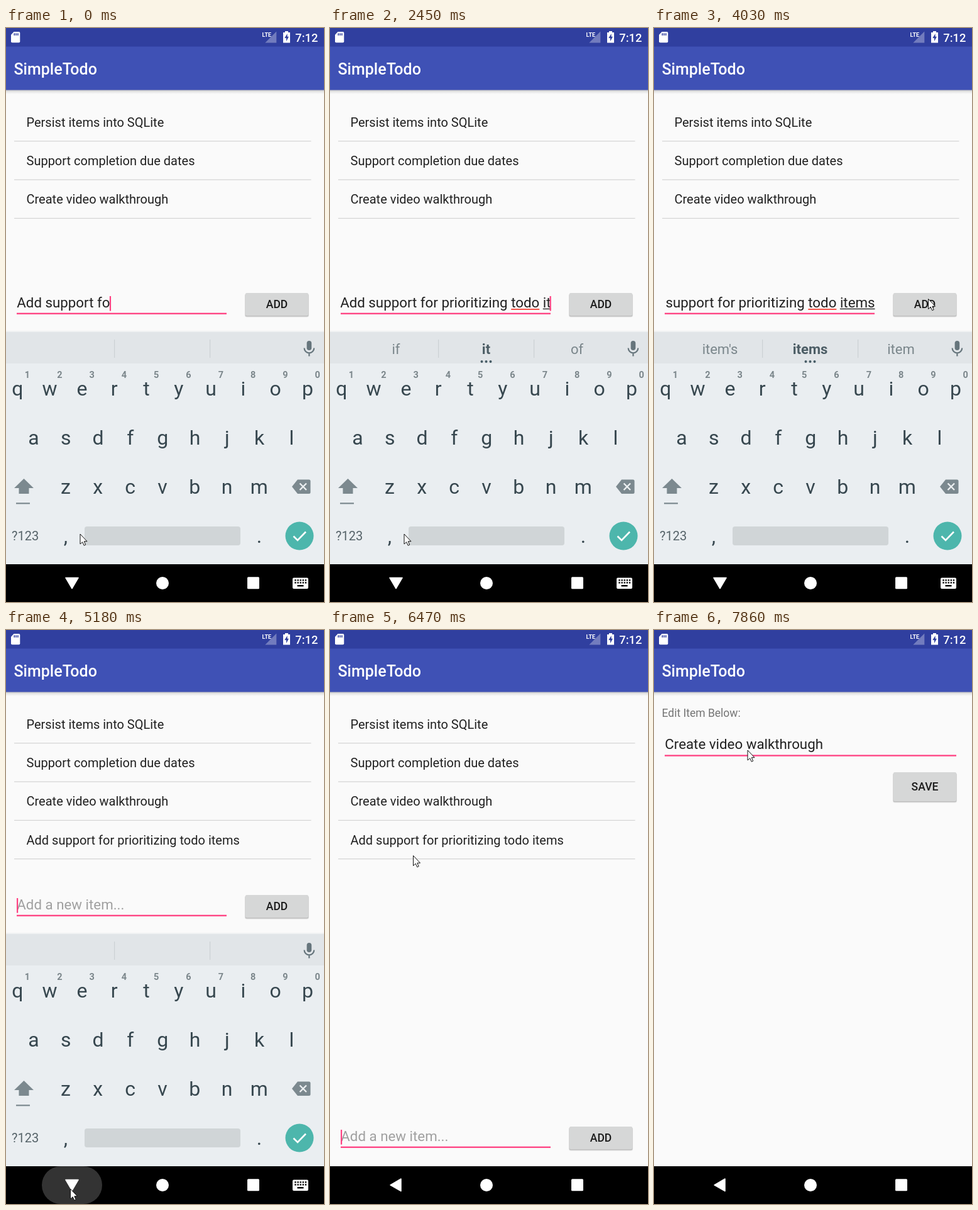
Recreate the animation shown at these times as an HTML page. Size 506 by 912 pixels, loop 7990 ms.

```html
<!DOCTYPE html>
<html lang="en">
<head>
<meta charset="utf-8">
<title>Todo list</title>
<style>
html, body { margin: 0; width: 100%; height: 100%; overflow: hidden; background: #fafafa; }
svg { display: block; width: 100vw; height: 100vh; font-family: Roboto, sans-serif; }
text { white-space: pre; }
.mid { text-anchor: middle; }
.row { font-size: 20px; fill: #212121; }
.field { font-size: 22.3px; fill: #212121; }
.label { font-size: 17.5px; font-weight: 500; fill: #1c1c1c; text-anchor: middle; }
.key { font-size: 32px; fill: #37474f; text-anchor: middle; }
.num { font-size: 14.5px; font-weight: 700; fill: #7b868b; text-anchor: middle; }
.sug { font-size: 22px; fill: #7a868b; text-anchor: middle; }
</style>
</head>
<body>
<svg id="stage" viewBox="0 0 506 912" preserveAspectRatio="none"></svg>
<script>
const LOOP = 7990;
const PINK = '#ff4081';
const $ = id => document.getElementById(id);
const text = (x, y, cls, s, more = '') => `<text x="${x}" y="${y}" class="${cls}" ${more}>${s}</text>`;
const rect = (x, y, w, h, fill, more = '') =>
  `<rect x="${x}" y="${y}" width="${w}" height="${h}" fill="${fill}" ${more}/>`;
const path = (d, fill, more = '') => `<path d="${d}" fill="${fill}" ${more}/>`;

const button = (y, h, label, id) =>
  rect(380, y + 1, 102, h + 1.5, '#000', 'rx="3" opacity=".09"') +
  rect(380.6, y + 1, 100.8, h + .6, '#000', 'rx="2.5" opacity=".16"') +
  rect(381, y, 100, h, '#d6d7d7', `rx="2" id="${id}"`) +
  text(431, y + h / 2 + 6.4, 'label', label);

const header = () =>
  rect(0, 0, 506, 852, '#fafafa') + rect(0, 98, 506, 7, 'url(#shade)') +
  rect(0, 0, 506, 98.5, '#3f51b5') + rect(0, 0, 506, 29.5, '#303f9f') +
  text(12.5, 74, '', 'SimpleTodo', 'font-size="25" font-weight="500" fill="#fff"');

const listRow = (s, i) =>
  text(32.5, 156.8 + i * 61.3, 'row', s) + rect(13, 179.2 + i * 61.3, 472.5, 1.2, '#d4d4d4');

const keyRow = (keys, x, y) => [...keys].map((k, i) => text(x + i * 51.3, y, 'key', k)).join('');

function keyboard() {
  const mic = rect(478.6, 497, 7.6, 15, '#66757c', 'rx="3.8"') +
    path('M474.6 508.5a7.8 7.8 0 0 0 15.6 0M482.4 516.5V521.5', 'none', 'stroke="#66757c" stroke-width="2.2"');
  const shift = path('M28.5 716L44 731H36.500V740H20.500V731H13Z', '#7c898f') + rect(16, 754.2, 22, 2.2, '#7c898f');
  const erase = path('M464 717.500H482a2.500 2.500 0 0 1 2.500 2.500V737.500a2.500 2.500 0 0 1-2.500 2.500H464L455 728.800Z', '#7c898f') +
    path('M467.500 723.500l10.500 10.500m0-10.500l-10.500 10.500', 'none', 'stroke="#eceff1" stroke-width="2.4"');
  const done = '<circle cx="467" cy="807" r="22.500" fill="#4db6ac"/>' +
    path('M457.500 807.500l6.500 6.500L477 800.500', 'none', 'stroke="#fff" stroke-width="2.6"');
  return rect(0, 481, 506, 2, '#f0f2f3') + rect(0, 483, 506, 369, '#e1e5e8') +
    rect(0, 533, 506, 319, '#eaeef1') +
    rect(172, 495, 1.2, 29, '#cbd1d4') + rect(324, 495, 1.2, 29, '#cbd1d4') + mic +
    [105, 248.5, 393].map((x, i) => text(x, 518, 'sug', '', `id="sug${i}"`)).join('') +
    '<g id="dots" fill="#455a64">' +
    [241.5, 248.5, 255.5].map(x => `<circle cx="${x}" cy="530" r="2"/>`).join('') + '</g>' +
    [...'1234567890'].map((n, i) => text(34 + i * 51.3, 556, 'num', n)).join('') +
    keyRow('qwertyuiop', 18.3, 583.5) + keyRow('asdfghjkl', 44, 661.5) + keyRow('zxcvbnm', 95, 740) +
    shift + erase + done + text(9, 814, '', '?123', 'font-size="20" fill="#566369"') +
    rect(125, 792, 248, 30, '#d0d5d7', 'rx="4"') +
    text(95, 818, 'key', ',') + text(403, 818, 'key', '.');
}

function keyboardIcon() {
  let holes = '';
  for (let r = 0; r < 2; r++)
    for (let c = 0; c < 5; c++) holes += rect(459.3 + c * 4.1, 876.2 + r * 4, 2.4, 2.3, '#000');
  return rect(456, 873.5, 25, 17.5, '#fff', 'rx="2"') + holes + rect(463.5, 885, 10, 2.4, '#000');
}

const statusIcons = () =>
  path('M12.500 6H20.500a1.800 1.800 0 0 1 1.800 1.800V21.500a1.800 1.800 0 0 1-1.800 1.800H9.800A1.800 1.800 0 0 1 8 21.500V10.700Z', '#fff') +
  [12.5, 15.3, 18.1].map(x => rect(x, 8.3, 1.6, 3.6, '#303f9f')).join('') +
  path('M430.300 5.500V23.500H412.300Z', '#fff', 'opacity=".32"') +
  text(407.5, 14, '', 'LTE', 'font-size="9" font-weight="700" fill="#fff" textLength-adjust="none"'.replace(' textLength-adjust="none"', '')) +
  path('M444 5H449V7H452V23.500H441V7H444Z', '#fff') +
  path('M447.600 9L443.300 16H446V21L450 13.800H447.600Z', '#303f9f') +
  text(460.3, 21.5, '', '7:12', 'font-size="18.300" font-weight="500" fill="#fff"');

$('stage').innerHTML = `
<defs>
  <linearGradient id="shade" x2="0" y2="1">
    <stop offset="0" stop-opacity=".26"/><stop offset=".4" stop-opacity=".09"/><stop offset="1" stop-opacity="0"/>
  </linearGradient>
  <clipPath id="fieldClip"><rect x="16.500" y="415" width="335.500" height="45"/></clipPath>
</defs>
${header()}
${['Persist items into SQLite', 'Support completion due dates', 'Create video walkthrough'].map(listRow).join('')}
<g id="added">${listRow('Add support for prioritizing todo items', 3)}</g>
${rect(13, 242, 472.5, 60, '#000', 'id="press"')}
<g id="entry">
  ${rect(17, 452.6, 334, 2.3, PINK)}
  <g clip-path="url(#fieldClip)">
    ${text(17.3, 443.6, 'field', '', 'id="typed"')}
    ${rect(0, 446, 0, 1.8, '#f44336', 'id="wrong"')}
    ${rect(0, 445.6, 0, 1.5, '#333', 'id="word"')}
    ${rect(0, 426, 2.2, 23.5, PINK, 'id="caret"')}
  </g>
  ${button(421, 36, 'ADD', 'add')}
</g>
<g id="keys">${keyboard()}</g>
<g id="edit">
  ${header()}
  ${text(12.5, 138.2, '', 'Edit Item Below:', 'font-size="17.500" fill="#757575"')}
  ${text(17.3, 189.2, 'field', 'Create video walkthrough')}
  ${rect(17, 198.4, 464, 2.3, PINK)}
  ${rect(270.3, 171, 2.2, 23.5, PINK, 'id="editCaret"')}
  ${button(226, 46, 'SAVE', 'save')}
</g>
${statusIcons()}
${rect(0, 852, 506, 60, '#000')}
${rect(57, 852, 96, 60, '#333', 'rx="30" id="ripple"')}
${path('M95 873.500H115L105 890.500Z', '#fff', 'id="down" stroke="#fff" stroke-width="1.500" stroke-linejoin="round"')}
${path('M96 881.800L113 872V891.500Z', '#fff', 'id="back" stroke="#fff" stroke-width="1.500" stroke-linejoin="round"')}
<circle cx="249" cy="882" r="10" fill="#fff"/>
${rect(384, 872.3, 19, 19, '#fff', 'rx="1.500"')}
<g id="switch">${keyboardIcon()}</g>
${path('M.5 .5V16.500L4.200 13.200L6.700 18.700L9.200 17.600L6.800 12.200H11.500Z', '#fff', 'id="mouse" stroke="#111" stroke-width="1"')}`;

// Bursts of screen updates: first, last, count
const bursts = [[0, 0, 1], [120, 1090, 8], [1240, 2140, 7], [2290, 2450, 2], [2920, 3890, 8],
  [4030, 5050, 8], [5180, 5600, 4], [6040, 6040, 1], [6470, 7470, 8], [7590, 7860, 3]];

function snap(t) {
  const [a, b, n] = bursts.filter(s => s[0] <= t).pop();
  if (n < 2) return a;
  const step = (b - a) / (n - 1);
  return a + step * Math.min(n - 1, Math.floor((t - a) / step + 1e-6));
}

// Time, words after "Add support ", suggestions
const typing = [
  [0, 'fo', ''],
  [120, 'for', ''],
  [260, 'for ', ''],
  [400, 'for p', ''],
  [530, 'for pr', ''],
  [670, 'for prio', 'per,pro,proof'],
  [810, 'for prior', 'prior,prio,prior to'],
  [950, 'for priori', 'priority,prior,priorities'],
  [1090, 'for prioriti', 'priority,priori,priorities'],
  [1240, 'for prioritizi', 'prioritize,prioritiz,prioritized'],
  [1390, 'for prioritizing', 'prioritize,prioritiz,prioritized'],
  [1540, 'for prioritizing', 'prioritizing,*prioritizing,prioritising'],
  [1690, 'for prioritizing ', 'the,and,your'],
  [1840, 'for prioritizing t', 'the,to,this'],
  [1990, 'for prioritizing to', 'too,*to,top'],
  [2140, 'for prioritizing todo', 'today,todo,to do'],
  [2290, 'for prioritizing todo ', 'list,and,the'],
  [2450, 'for prioritizing todo it', 'if,*it,of'],
  [2920, 'for prioritizing todo ite', 'item,ite,items'],
  [3060, 'for prioritizing todo item', 'items,*item,it'],
  [3200, 'for prioritizing todo items', "item's,*items,item"],
  [4320, null, '']
];

const moves = [[0, 117.5, 803.5], [3340, 117.5, 803.5], [3890, 436, 430], [4470, 436, 430], [5050, 102, 887.5],
  [5320, 102, 887.5], [5600, 209, 841], [6040, 209, 841], [6470, 132, 358], [6620, 139, 288],
  [6760, 141, 272], [7180, 141, 272], [7470, 142, 186], [7860, 148.5, 190.5]];

const pen = document.createElement('canvas').getContext('2d');
const width = s => { pen.font = '22.3px Roboto, sans-serif'; return pen.measureText(s).width; };
const ramp = (t, a, b) => Math.max(0, Math.min(1, (t - a) / (b - a)));
const within = (t, ...spans) => spans.some(([a, b]) => t >= a && t < b);
const set = (id, attrs) => { for (const k in attrs) $(id).setAttribute(k, attrs[k]); };
const show = (id, on) => set(id, { opacity: +on });

function pointer(t) {
  const i = moves.findIndex(m => m[0] > t);
  if (i < 0) return moves[moves.length - 1].slice(1);
  const [a, x, y] = moves[i - 1], [b, u, v] = moves[i];
  let p = ramp(t, a, b);
  p = p * p * (3 - 2 * p);
  return [x + (u - x) * p, y + (v - y) * p];
}

function drawField(t) {
  const [, tail, hints] = typing.filter(s => s[0] <= t + 15).pop();
  const empty = tail === null;
  const str = empty ? '' : 'Add support ' + tail;
  const x = 17.3 + Math.min(0, 334.2 - width(str));
  $('typed').textContent = empty ? 'Add a new item...' : str;
  set('typed', { x, style: empty ? 'fill:#a0a0a0' : '' });
  set('caret', { x: empty ? 17 : Math.min(349.6, x + width(str) - .6) });
  show('caret', !within(t, [3880, 4310], [4540, 5040], [5540, 6035], [6540, 7040]));

  const at = str.indexOf('todo');
  const mark = (id, from, s, on) => set(id, { x: x + width(str.slice(0, from)), width: on ? width(s) : 0 });
  mark('wrong', at, 'todo', at > 0 && str.length > at + 4);
  mark('word', at + 5, str.slice(at + 5), at > 0 && str.length > at + 5);

  const list = hints ? hints.split(',') : ['', '', ''];
  list.forEach((s, i) => {
    const bold = s[0] === '*';
    $('sug' + i).textContent = bold ? s.slice(1) : s;
    set('sug' + i, { style: i === 1 ? `fill:#4c5d65;font-weight:${bold ? 700 : 400}` : '' });
  });
  show('dots', hints !== '');
}

function draw(now) {
  const t = snap(now % LOOP);
  drawField(t);
  show('added', t > 4310);
  const held = ramp(t, 4030, 4180) * (1 - ramp(t, 4320, 4620));
  set('add', { fill: `rgb(${[214, 215, 215].map(c => Math.round(c - 28 * held))})` });

  const hide = ramp(t, 5180, 5450);
  set('keys', { transform: `translate(0 ${hide * hide * 371})`, opacity: 1 - hide * .6 });
  $('keys').style.display = hide < 1 ? '' : 'none';
  const closing = t > 5300;
  set('entry', { transform: `translate(0 ${closing ? 368 : 0})` });
  show('down', !closing);
  show('back', closing);
  show('switch', !closing);
  set('ripple', { opacity: ramp(t, 4900, 5180) * (1 - ramp(t, 5180, 5600)) });

  set('press', { opacity: .13 * ramp(t, 6620, 6900) });
  const open = ramp(t, 6900, 7330), ease = 1 - (1 - open) ** 3;
  set('edit', { opacity: Math.min(1, open * 1.6), transform: `translate(0 ${73 * (1 - ease)})` });
  show('editCaret', t < 7715);

  set('mouse', { transform: `translate(${pointer(t)})` });
}

const start = performance.now();
function tick() {
  draw(performance.now() - start);
  requestAnimationFrame(tick);
}
tick();
</script>
</body>
</html>
```
